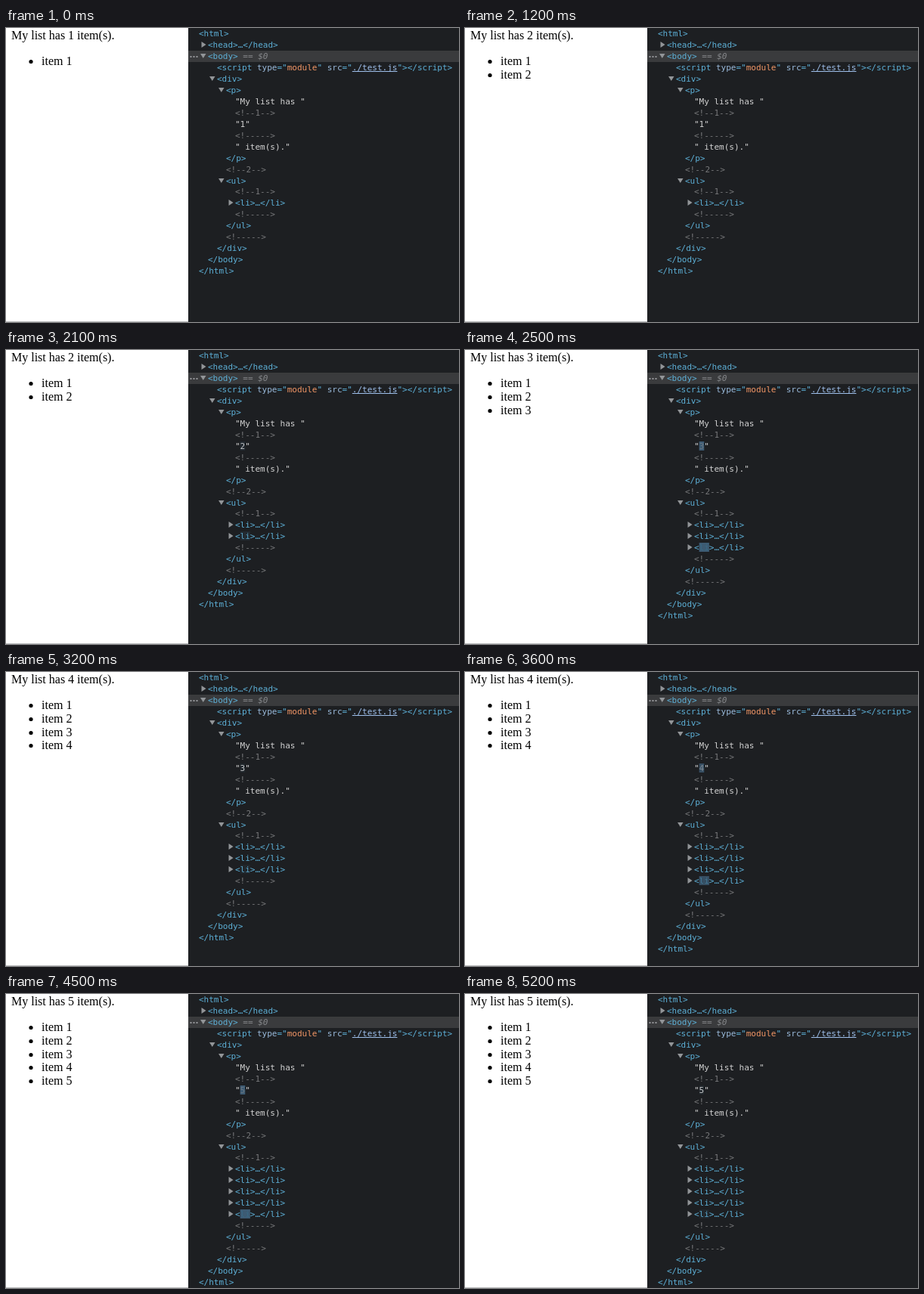
These frames come from a looping animation (599 px wide and 389 px high, 5.3 s). An HTML page with a canvas:

```html
<!DOCTYPE html>
<html lang="en">
<head>
<meta charset="utf-8">
<title>List and element tree</title>
<style>
  html, body { margin: 0; width: 100%; height: 100%; overflow: hidden; background: #fff; }
  canvas { display: block; }
</style>
</head>
<body>
<canvas id="stage" width="599" height="389"></canvas>
<script>
const ctx = document.getElementById('stage').getContext('2d');
const WIDTH = 599, HEIGHT = 389, SPLIT = 241;
const LOOP = 5300, STEP = 100, FIRST_ADD = 1200, ADD_EVERY = 1000, TREE_DELAY = 100;
const FLASH_TIME = 1400;
const MONO = '11px "DejaVu Sans Mono", monospace';
const SERIF = '16px "Liberation Serif", serif';
const CHAR = 6.622, INDENT = 12;

const PANEL = [29, 31, 34], TAG = [93, 176, 215], TEXT = [211, 211, 211];
const FLASH_BACK = [82, 130, 168], FLASH_TEXT = [34, 58, 78];
const COMMENT = '#77787a', NAME = '#9bbbdc', VALUE = '#f29766', ARROW = '#929598';

const rgb = c => `rgb(${c.map(Math.round).join(',')})`;
const mix = (a, b, k) => a.map((v, i) => v + (b[i] - v) * k);
const countAt = t => t < FIRST_ADD ? 1 : Math.min(5, 2 + Math.floor((t - FIRST_ADD) / ADD_EVERY));
const rowMiddle = row => Math.round(7.2 + row * 14.95);
const indentX = level => 255 + level * INDENT;

// cubic-bezier(0, 0, 0.2, 1)
function easeOut(x) {
  let lo = 0, hi = 1;
  for (let i = 0; i < 20; i++) {
    const s = (lo + hi) / 2;
    if (0.6 * s * s + 0.4 * s ** 3 < x) lo = s; else hi = s;
  }
  return 3 * lo * lo - 2 * lo ** 3;
}

function write(text, x, y, color, font = MONO) {
  ctx.font = font;
  ctx.fillStyle = color;
  ctx.fillText(text, x, y);
}

function drawPage(count) {
  ctx.fillStyle = '#fff';
  ctx.fillRect(0, 0, SPLIT, HEIGHT);
  write(`My list has ${count} item(s).`, 7, 15, '#000', SERIF);
  for (let i = 0; i < count; i++) {
    const y = Math.round(49 + i * 17.8);
    write(`item ${i + 1}`, 47, y, '#000', SERIF);
    ctx.beginPath();
    ctx.arc(33, y - 4.5, 2.6, 0, Math.PI * 2);
    ctx.fill();
  }
  ctx.fillStyle = '#bcbdbf';
  ctx.fillRect(0, HEIGHT - 1, SPLIT, 1);
}

function drawArrow(x, y, open) {
  ctx.fillStyle = ARROW;
  ctx.beginPath();
  if (open) {
    ctx.moveTo(x - 10, y - 3);
    ctx.lineTo(x - 2.5, y - 3);
    ctx.lineTo(x - 6.25, y + 3);
  } else {
    ctx.moveTo(x - 8.5, y - 4);
    ctx.lineTo(x - 2.5, y);
    ctx.lineTo(x - 8.5, y + 4);
  }
  ctx.fill();
}

function drawRow(row, level, parts, arrow) {
  const y = rowMiddle(row);
  let x = indentX(level);
  if (arrow) drawArrow(x, y, arrow === 'open');
  for (const { text, color, flash, link, font } of parts) {
    const width = text.length * CHAR;
    let ink = color;
    if (flash !== undefined) {
      ctx.fillStyle = rgb(mix(FLASH_BACK, PANEL, flash));
      ctx.fillRect(x, y - 6, width, 12);
      ink = mix(FLASH_TEXT, color, flash);
    }
    const style = Array.isArray(ink) ? rgb(ink) : ink;
    write(text, x, y + 4, style, font);
    if (link) ctx.fillRect(x, y + 5, width, 1);
    x += width;
  }
}

const part = (text, color, extra) => ({ text, color, ...extra });
const tag = (text, extra) => part(text, TAG, extra);
const string = (text, extra) => part(text, TEXT, extra);
const comment = text => part(text, COMMENT);

function treeRows(count, flash) {
  const fresh = flash === undefined ? {} : { flash };
  const items = Array.from({ length: count }, (_, i) => [
    4, [tag('<'), tag('li', i === count - 1 ? fresh : {}), tag('>…</li>')], 'closed'
  ]);
  const empty = '<!----->';
  return [
    [0, [tag('<html>')]],
    [1, [tag('<head>…</head>')], 'closed'],
    [1, [tag('<body>'), part(' == $0', '#85878a', { font: 'italic ' + MONO })], 'open'],
    [2, [tag('<script '), part('type', NAME), tag('="'), part('module', VALUE), tag('" '),
         part('src', NAME), tag('="'), part('./test.js', '#9fc0ec', { link: true }),
         tag('"></' + 'script>')]],
    [2, [tag('<div>')], 'open'],
    [3, [tag('<p>')], 'open'],
    [4, [string('"My list has "')]],
    [4, [comment('<!--1-->')]],
    [4, [string('"'), string(String(count), fresh), string('"')]],
    [4, [comment(empty)]],
    [4, [string('" item(s)."')]],
    [3, [tag('</p>')]],
    [3, [comment('<!--2-->')]],
    [3, [tag('<ul>')], 'open'],
    [4, [comment('<!--1-->')]],
    ...items,
    [4, [comment(empty)]],
    [3, [tag('</ul>')]],
    [3, [comment(empty)]],
    [2, [tag('</div>')]],
    [1, [tag('</body>')]],
    [0, [tag('</html>')]]
  ];
}

function drawTree(t) {
  const count = countAt(t);
  const age = t - FIRST_ADD - (count - 2) * ADD_EVERY;
  const flash = count > 1 && age < FLASH_TIME ? easeOut(age / FLASH_TIME) : undefined;

  ctx.fillStyle = rgb(PANEL);
  ctx.fillRect(SPLIT, 0, WIDTH - SPLIT, HEIGHT);
  ctx.fillStyle = '#3a3b3d';
  ctx.fillRect(SPLIT, 30, WIDTH - SPLIT, 15);
  ctx.fillStyle = '#96989b';
  for (let i = 0; i < 3; i++) ctx.fillRect(243.5 + i * 4, 37, 2, 2);

  treeRows(count, flash).forEach((row, i) => drawRow(i, ...row));
}

function frame() {
  const t = Math.floor((performance.now() % LOOP) / STEP) * STEP;
  drawPage(countAt(t));
  drawTree(t - TREE_DELAY);
  requestAnimationFrame(frame);
}
frame();
</script>
</body>
</html>
```
